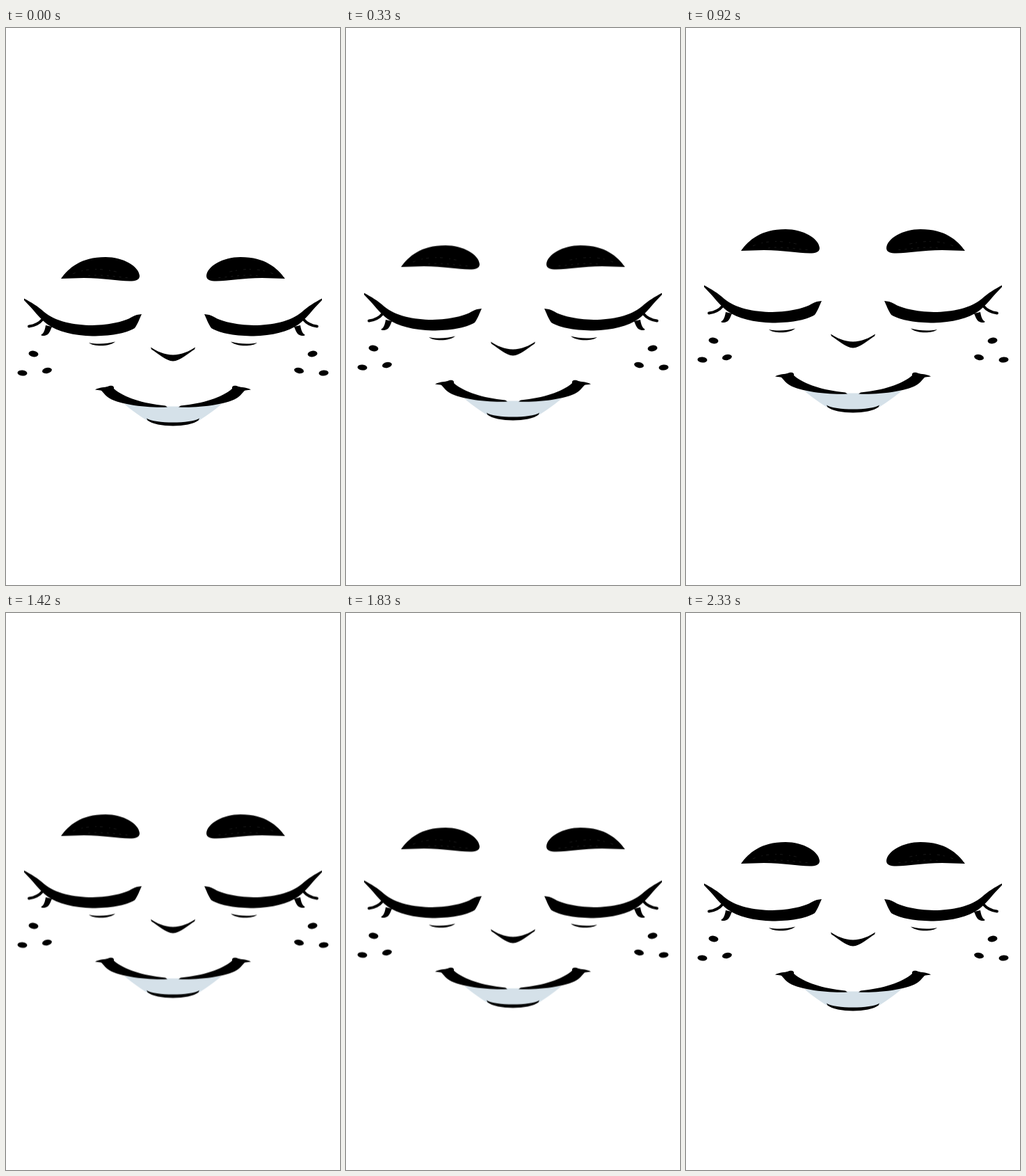
Write an HTML page that moves like this. It is 480 px wide and 800 px high and loops after 2.83 s.

```html
<!DOCTYPE html>
<html lang="en">
<head>
<meta charset="utf-8">
<title>Calm face</title>
<style>
  html, body { margin: 0; width: 100%; height: 100%; overflow: hidden; background: #fff; }
  svg { display: block; width: 100%; height: 100%; }
  .streak { fill: none; stroke: #fff; stroke-width: .5; opacity: .2; }
  .lash { fill: none; stroke: #000; stroke-width: 4; stroke-linecap: round; }
</style>
</head>
<body>
<svg viewBox="0 0 480 800">
  <defs>
    <filter id="ink" filterUnits="userSpaceOnUse" x="0" y="300" width="480" height="300" color-interpolation-filters="sRGB">
      <feTurbulence type="fractalNoise" baseFrequency=".3" seed="4"/>
      <feDisplacementMap in="SourceGraphic" scale="1.4" xChannelSelector="R" yChannelSelector="G"/>
    </filter>

    <g id="brow">
      <path d="M79 360C90 345 107 329 143 329C168 329 191 342 192 356C192 362 186 363.5 178 363.5C160 363 140 359.5 112 359Z"/>
      <g class="streak">
        <path stroke-dasharray="4 9 2 5" d="M96 353C118 344 140 345 166 352"/>
        <path stroke-dasharray="3 6" d="M118 356C138 353 158 358 180 359"/>
      </g>
    </g>

    <g id="eye">
      <!-- closed lid and two lashes -->
      <path d="M26 388.5C36 394 46 399.5 55 408C70 421 98 427 124 427C150 426.5 172 421 181 415C186 412 190 411.5 195 411C192 417 190 424 185 431C172 439 148 442.5 124 442.5C98 442 74 436 60 426C48 417 40 405 26 391Z"/>
      <path class="lash" d="M53 418C48 424 42 427.5 33 428.5"/>
      <path d="M57 427L66 429C63 436 62 440 57 441.5C53 442.5 50 442 50.5 440.5C54 439 56 434 57 427Z"/>
      <!-- crease under the eye -->
      <path d="M119 452C130 454.5 145 454 157 450.5C150 457.5 127 458.5 119 452Z"/>
      <!-- freckles -->
      <ellipse rx="7" ry="4.3" transform="translate(39.5 468) rotate(8)"/>
      <ellipse rx="7" ry="4" transform="translate(23.5 495.5) rotate(4)"/>
      <ellipse rx="7" ry="4" transform="translate(59 492) rotate(-12)"/>
    </g>

    <path id="lip" d="M128 519.5C134 516 143 516 146 515C150 513 156 513 155 518C170 531 196 539 229 542.5L232 544.5C206 546 160 541 146 530C140 525 138 520.5 136 520.5Z"/>
  </defs>

  <g id="brows">
    <g filter="url(#ink)">
      <use href="#brow"/>
      <use href="#brow" transform="matrix(-1 0 0 1 480 0)"/>
    </g>
  </g>

  <g id="face">
    <path fill="#d5e1e9" d="M170 540L230 543.5H250L310 540C296 552 286 558 277 564C255 569 225 569 203 564C194 558 184 552 170 540Z"/>
    <g filter="url(#ink)">
      <use href="#eye"/>
      <use href="#eye" transform="matrix(-1 0 0 1 480 0)"/>
      <path d="M208 458.5C216 464 228 469.5 240 469.5S264 464 272 458.5L271 461.5C262 467 250 478.5 240 478.5S218 467 209 461.5Z"/>
      <use href="#lip"/>
      <use href="#lip" transform="matrix(-1 0 0 1 480 0)"/>
      <path d="M202 560.5C214 568.5 266 568.5 278 560.5L276.5 563.5C264 574 216 574 203.5 563.5Z"/>
    </g>
  </g>
</svg>
<script>
  const LOOP = 2830;
  const FPS = 12;
  const RISE = { start: 0, end: 11 };
  const FALL = { start: 16, end: 28 };

  const parts = {
    brows: { height: 40, rise: bezier(.33, .42), fall: bezier(.6, .42) },
    face: { height: 19, rise: bezier(.33, .42), fall: bezier(.39, .22) }
  };

  // Ease from 0 to 1 with level ends: cubic-bezier(x1, 0, x2, 1).
  function bezier(x1, x2) {
    const curve = (s, a, b) => 3 * s * (1 - s) ** 2 * a + 3 * s * s * (1 - s) * b + s ** 3;
    return x => {
      let low = 0, high = 1;
      for (let i = 0; i < 30; i++) {
        const mid = (low + high) / 2;
        if (curve(mid, x1, x2) < x) low = mid; else high = mid;
      }
      return curve(low, 0, 1);
    };
  }

  const progress = (step, { start, end }) =>
    Math.min(1, Math.max(0, (step - start) / (end - start)));

  // Drawn on twelves, with times rounded to 10 ms.
  const stepTime = step => Math.round(step * 100 / FPS) * 10;

  function pose(step, { height, rise, fall }) {
    const lift = height * (rise(progress(step, RISE)) - fall(progress(step, FALL)));
    return {
      offset: stepTime(step) / LOOP,
      transform: `translate(0px, ${-lift.toFixed(2)}px)`,
      easing: 'steps(1, end)'
    };
  }

  for (const [id, part] of Object.entries(parts)) {
    const frames = [];
    for (let step = 0; stepTime(step) <= LOOP; step++) frames.push(pose(step, part));
    document.getElementById(id).animate(frames, { duration: LOOP, iterations: Infinity });
  }
</script>
</body>
</html>
```
